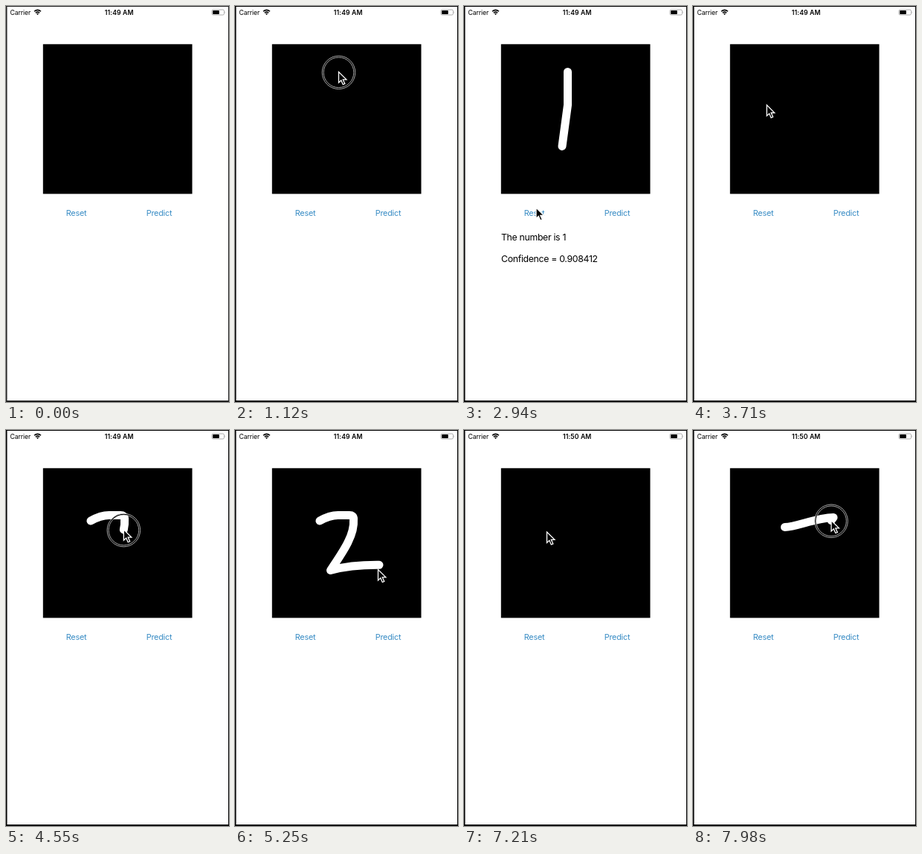
Recreate the animation shown at these times as an HTML page. Size 300x532 px, loop 8000 ms.

```html
<!DOCTYPE html>
<html lang="en">
<head>
<meta charset="utf-8">
<title>Digit recognizer</title>
<style>
  html, body { margin: 0; width: 100%; height: 100%; overflow: hidden; background: #fff; }
  svg { display: block; width: 300px; height: 532px; font-family: Inter, Roboto, sans-serif; }
  .status { font-size: 8.7px; }
  .button { font-size: 10.9px; letter-spacing: -.25px; fill: #3a8dc5; text-anchor: middle; }
  .label { font-size: 12.3px; letter-spacing: -.32px; }
  #ink { fill: none; stroke: #fff; stroke-width: 11; stroke-linecap: round; stroke-linejoin: round; }
</style>
</head>
<body>
<svg viewBox="0 0 300 532">
  <rect width="300" height="532" fill="#fff"/>
  <path id="frame" fill-rule="evenodd" d="M0 0H300V532H0ZM1.5 1V530H299V1Z"/>

  <g class="status">
    <text x="5.5" y="11.7" letter-spacing="-.1">Carrier</text>
    <text id="clock" x="152.2" y="11.9" font-weight="600" letter-spacing=".1" text-anchor="middle"></text>
  </g>
  <g fill="none" stroke="#000" stroke-width="1.5">
    <path d="M38 7.3Q42.5 3.4 47 7.3M39.8 9.3Q42.5 7 45.2 9.3"/>
    <path d="M42.5 12L41 10.4Q42.5 9.3 44 10.4Z" fill="#000" stroke="none"/>
  </g>
  <rect x="277" y="5" width="16.5" height="7" rx="1.8" fill="none" stroke="#999" stroke-width=".8"/>
  <rect x="278.2" y="6.1" width="8.6" height="4.8" rx=".7"/>
  <path d="M294.6 7.2Q296 8.5 294.6 9.8Z" fill="#999"/>

  <rect x="49.8" y="51.3" width="200.7" height="201.1"/>
  <path id="ink" pathLength="1"/>
  <text id="reset" class="button" x="94.5" y="281.7">Reset</text>
  <text id="predict" class="button" x="206" y="281.7">Predict</text>
  <text id="digit" class="label" x="50" y="315"></text>
  <text id="confidence" class="label" x="50" y="343.6"></text>

  <g id="pointer">
    <g id="ring" fill="none" transform="translate(0 .8)">
      <circle r="21.3" stroke="#000" stroke-width="1.6"/>
      <circle r="22.3" stroke="#ccc" stroke-width=".8"/>
      <circle r="20.3" stroke="#ccc" stroke-width=".8"/>
    </g>
    <path d="M0 0V14.5L3.3 11.4 5.8 17 8.3 15.9 5.8 10.4H10.4Z" stroke="#fff" stroke-width="1.3"/>
  </g>
</svg>
<script>
const LOOP = 8000, STEP = 70, TAP = 70, FADE = 300;
const $ = id => document.getElementById(id);

function gesture(from, to, d, ease) {
  const path = document.createElementNS("http://www.w3.org/2000/svg", "path");
  path.setAttribute("d", d);
  const length = path.getTotalLength();
  const progress = t => ease(Math.min(1, Math.max(0, (t - from) / (to - from))));
  return { from, to, d, progress, at: t => path.getPointAtLength(length * progress(t)) };
}
const move = (from, to, d) => gesture(from, to, d, p => 1 - (1 - p) ** 3);
const stroke = (from, to, d) => gesture(from, to, d, p => p);

// Each round: press and draw, then tap Predict, then tap Reset
const rounds = [
  { press: 1050, predict: 2450, reset: 3360, digit: 1, confidence: "0.908412",
    stroke: stroke(1120, 1610, "M139.5 88.5V133L132 188.5") },
  { press: 4130, predict: 5810, reset: 6790, digit: 2, confidence: "0.653154",
    stroke: stroke(4270, 5110, "M114 122Q128 114 140 114.5H153Q160 114 159.5 120C161 140 148 160 128.5 188.5Q156 181 194 181.3") },
  { press: 7630, predict: Infinity, reset: Infinity,
    stroke: stroke(7630, 7980, "M123.5 130.5C140 130 165 118 189 117.5L186 121.5") }
];
const gestures = [
  move(70, 910, "M149 463C146 250 124 -110 139.5 88.5"),
  move(1750, 2100, "M132 188.5L118 273"),
  move(2100, 2310, "M118 273L200 280"),
  move(2590, 2940, "M200 280L97 271"),
  move(3430, 3990, "M97 271C97 180 86 122 114 122"),
  move(5250, 5740, "M192.5 187.5L200 280"),
  move(6090, 6440, "M200 280L100 280.5"),
  move(6860, 7490, "M100 280.5C104 180 96 134 123.5 130.5"),
  ...rounds.map(r => r.stroke)
].sort((a, b) => a.from - b.from);

function drawButton(id, t) {
  const round = rounds.find(r => t >= r[id] - TAP && t < r[id] + FADE);
  $(id).setAttribute("opacity", round ? 0.2 + 0.8 * Math.max(0, t - round[id]) / FADE : 1);
}

function drawInk(t) {
  const round = rounds.find(r => t > r.stroke.from && t < r.reset);
  $("ink").setAttribute("d", round ? round.stroke.d : "");
  if (round) $("ink").setAttribute("stroke-dasharray", `${round.stroke.progress(t)} 2`);
}

function drawResult(t) {
  const result = rounds.find(r => t >= r.predict && t < r.reset);
  $("digit").textContent = result ? `The number is ${result.digit}` : "";
  $("confidence").textContent = result ? `Confidence = ${result.confidence}` : "";
}

function drawPointer(t) {
  const current = gestures.findLast(g => t >= g.from);
  $("pointer").setAttribute("visibility", current ? "visible" : "hidden");
  if (!current) return;
  const { x, y } = current.at(t);
  $("pointer").setAttribute("transform", `translate(${x} ${y})`);

  const pressed = rounds.some(r =>
    t >= r.press && (t < r.stroke.to || r.stroke.to + STEP > LOOP) ||
    [r.predict, r.reset].some(up => t >= up - TAP && t < up));
  $("ring").setAttribute("opacity", pressed ? 1 : 0);
}

function draw(t) {
  $("frame").setAttribute("fill", t < rounds[0].press ? "#222" : "#000");
  $("clock").textContent = t < 7210 ? "11:49 AM" : "11:50 AM";
  drawButton("predict", t);
  drawButton("reset", t);
  drawInk(t);
  drawResult(t);
  drawPointer(t);
}

function tick() {
  const t = performance.now() % LOOP;
  draw(Math.floor(t / STEP) * STEP);
  requestAnimationFrame(tick);
}
tick();
</script>
</body>
</html>
```
